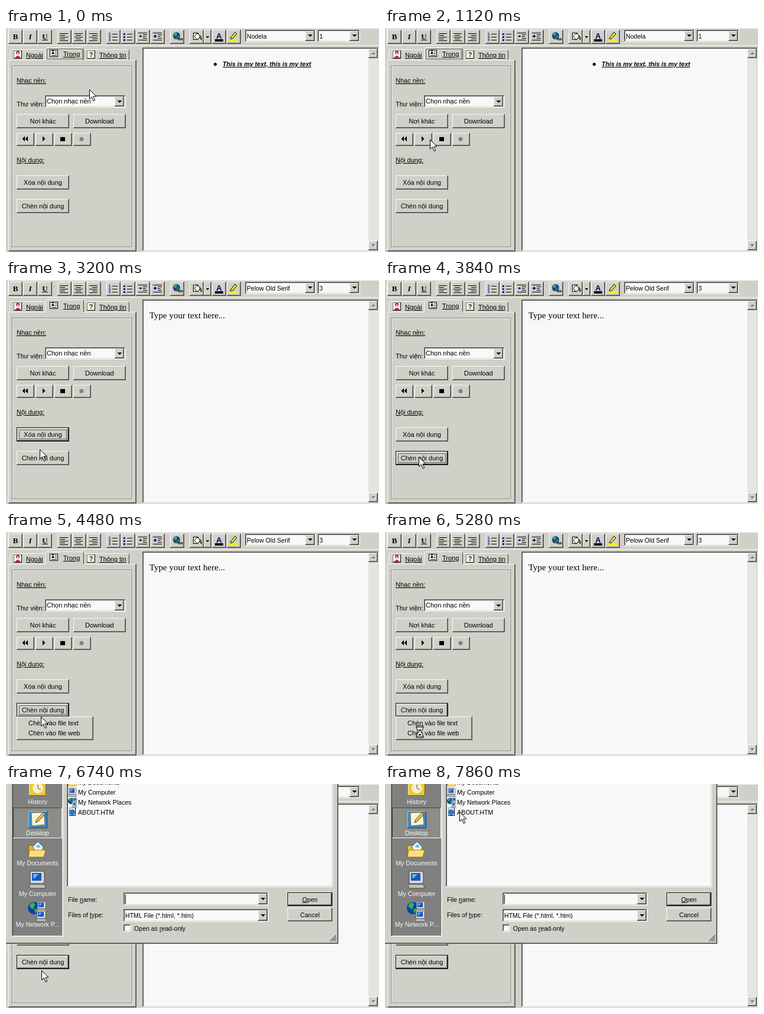
Write an HTML page that moves like this. It is 632 px wide and 380 px high and loops after 8 s.

```html
<!DOCTYPE html>
<html lang="vi">
<head>
<meta charset="utf-8">
<title>Editor panel</title>
<style>
html, body { margin: 0; width: 100%; height: 100%; overflow: hidden; background: #d0d0c8; }
svg { display: block; width: 632px; height: 380px; }
text { font: 11px "Liberation Sans", Arial, sans-serif; white-space: pre; }
.narrow { font-size: 10.6px; }
.u { text-decoration: underline; }
.bold { font-weight: bold; }
.italic { font-style: italic; }
.serif { font-family: "Liberation Serif", Times, serif; }
.size13 { font-size: 13px; }
.size15 { font-size: 15px; }
.tiny { font-size: 6px; }
path, rect { shape-rendering: crispEdges; }
.smooth, .smooth path { shape-rendering: auto; }
</style>
</head>
<body>
<svg id="stage" viewBox="0 0 632 380" xmlns="http://www.w3.org/2000/svg"></svg>
<script>
const FACE = '#d0d0c8', WHITE = '#f8f8f8', GREY = '#808080', DARK = '#404040', BLACK = '#000', BLUE = '#000090';
const LOOP = 8000, STEP = 160;

const rect = (x, y, w, h, fill) => `<rect x="${x}" y="${y}" width="${w}" height="${h}" fill="${fill}"/>`;
const shape = (d, fill, stroke = 'none', extra = '') => `<path d="${d}" fill="${fill}" stroke="${stroke}" ${extra}/>`;
const smooth = (d, fill, stroke = 'none', extra = '') => shape(d, fill, stroke, 'class="smooth" ' + extra);
const disc = (x, y, r, fill) => `<circle cx="${x}" cy="${y}" r="${r}" fill="${fill}"/>`;
const text = (x, y, s, style = '', attrs = '') => `<text x="${x}" y="${y}" class="${style}" ${attrs}>${s}</text>`;
const centered = (x, y, s, style = '', fill = BLACK) => text(x, y, s, style, `text-anchor="middle" fill="${fill}"`);
const group = (id, ...parts) => `<g id="${id}">${parts.join('')}</g>`;
const at = (x, y, ...parts) => `<g transform="translate(${x} ${y})">${parts.join('')}</g>`;

function frame(x, y, w, h, topLeft, bottomRight) {
  const l = x + .5, t = y + .5, r = x + w - .5, b = y + h - .5, cap = 'stroke-linecap="square"';
  return shape(`M${l} ${b}V${t}H${r}`, 'none', topLeft, cap) +
         shape(`M${r} ${t}V${b}H${l}`, 'none', bottomRight, cap);
}
const raised = (x, y, w, h) => rect(x, y, w, h, FACE) +
  frame(x, y, w, h, WHITE, DARK) + frame(x + 1, y + 1, w - 2, h - 2, FACE, GREY);
const sunken = (x, y, w, h, fill = WHITE) => rect(x, y, w, h, fill) +
  frame(x, y, w, h, GREY, WHITE) + frame(x + 1, y + 1, w - 2, h - 2, DARK, FACE);
const etched = (x, y, w, h) => frame(x + 1, y + 1, w, h, WHITE, WHITE) + frame(x, y, w, h, GREY, GREY);
const dotted = (x, y, w, h) =>
  shape(`M${x + .5} ${y + .5}h${w - 1}v${h - 1}h${1 - w}z`, 'none', BLACK, 'stroke-dasharray="1 1"');

const downArrow = (x, y, c = BLACK) => shape(`M${x - 4} ${y - 2}h8l-4 4z`, c);

function button(x, y, w, h, label, isDefault = false, style = '') {
  const box = isDefault ? rect(x, y, w, h, BLACK) + raised(x + 1, y + 1, w - 2, h - 2) : raised(x, y, w, h);
  return box + centered(x + w / 2, y + h / 2 + 4, label, style);
}
function combo(x, y, w, h, label, base = y + h - 6) {
  const ax = x + w - 18;
  return sunken(x, y, w, h) + text(x + 3, base, label, 'narrow') +
    raised(ax, y + 2, 16, h - 4) + downArrow(ax + 8, Math.floor(y + h / 2));
}

// Lines of a paragraph or list glyph; each line is [offset, length].
const bars = (lines, color = BLACK) =>
  lines.map(([dx, len], i) => rect(dx, i * 3, len, 1, color)).join('');
const aligned = pull => bars([14, 9, 14, 9, 14].map(n => [Math.floor((14 - n) * pull), n]));

function globe(x, y, r) {
  return disc(x, y, r, '#1040a8') +
    smooth(`M${x - r * .8} ${y - r * .3}q${r * .5} ${-r} ${r} ${-r * .3}l${-r * .4} ${r * .8}z` +
      `M${x} ${y + r * .2}l${r * .8} ${-r * .3}l${-r * .5} ${r * .9}z`, '#30b848');
}

function toolbar() {
  const buttonXs = [4, 29, 54, 87, 112, 137, 170, 195, 220, 245, 278, 311, 349, 374];
  const glyph = (x, s, style) => centered(x, 19, s, 'serif bold size13 ' + style);
  const threeRows = row => [0, 1, 2].map(row).join('');
  const numbers = threeRows(i => text(0, i * 5 + 2, i + 1, 'tiny bold', `fill="${BLUE}"`));
  const bullets = threeRows(i => rect(0, i * 5 - 1, 3, 3, BLUE));
  const listLines = threeRows(i => rect(6, i * 5, 9, 1, BLACK));
  const indent = arrow => bars([[0, 15], [8, 7], [8, 5], [8, 7], [0, 15]]) + shape(arrow, BLUE);
  return rect(3, 0, 629, 1, WHITE) + rect(3, 0, 1, 29, WHITE) + rect(3, 29, 629, 1, WHITE) +
    buttonXs.map(x => raised(x, 3, 24, 24)).join('') +
    glyph(16, 'B', '') + glyph(41, 'I', 'italic') + glyph(66, 'U', '') + rect(61, 20, 10, 1, BLACK) +
    at(91, 9, aligned(0)) + at(116, 9, aligned(.5)) + at(141, 9, aligned(1)) +
    at(174, 10, numbers, listLines) + at(199, 10, bullets, listLines) +
    at(224, 8, indent('M1 6l3-3v2h2v2h-2v2z')) + at(249, 8, indent('M6 6l-3-3v2h-2v2h2v2z')) +
    globe(289, 13, 6) + smooth('M286 17h6m1 2h5', 'none', BLACK, 'stroke-width="3" stroke-linecap="round"') +
    smooth('M286 17h6m1 2h5', 'none', FACE, 'stroke-linecap="round"') +
    rect(317, 8, 9, 12, WHITE) + frame(317, 8, 9, 12, BLACK, BLACK) +
    smooth('M319 14l5-5 6 5-6 6z', WHITE, BLACK) + smooth('M328 13q4 1 3 7q-3-2-3-7', '#c8b000', BLACK) +
    raised(335, 3, 13, 24) + shape('M338 14h6l-3 3z', BLACK) +
    centered(361, 18, 'A', 'bold size13', '#000060') + rect(354, 19, 14, 4, BLACK) +
    smooth('M381 16l7-9 3 3-7 8-4 1z', '#f8e820', BLACK) + rect(379, 19, 14, 4, '#f8f000');
}

function tab(x, y, w, label, labelX) {
  const h = 55 - y;
  return rect(x, y, w, h, FACE) + shape(`M${x + .5} 55V${y + 2.5}l2-2H${x + w - 2}`, 'none', WHITE) +
    shape(`M${x + w - .5} ${y + 2}V54`, 'none', DARK) + text(labelX, y < 35 ? 48 : 50, label, 'u');
}

function sidePanel() {
  const media = 'M27 188l5-4v8zM32 188l5-4v8zM62 184l4 4-4 4zM92 185h8v7h-8z';
  return tab(6, 36, 61, 'Ngoài', 34) + tab(131, 36, 78, 'Thông tin', 158) +
    raised(4, 54, 217, 325) + tab(66, 33, 66, 'Trong', 97) + rect(67, 54, 63, 2, FACE) +
    rect(13, 38, 14, 14, WHITE) + frame(13, 38, 14, 14, GREY, BLACK) +
    disc(20, 42, 3, '#a01028') + disc(20, 43, 2, '#f0b890') + smooth('M15 51q5-8 10 0z', '#e02048') +
    rect(74, 37, 14, 12, WHITE) + frame(74, 37, 14, 12, BLACK, BLACK) +
    smooth('M77 44l2.5-5 2.5 5zM78 37h3v2h-3z', BLACK) +
    at(77, 40, bars([[6, 3], [6, 3], [0, 9]])) +
    rect(137, 38, 14, 14, '#f8f8c0') + frame(137, 38, 14, 14, GREY, BLACK) +
    centered(144, 49, '?', 'bold', '#1010b0') +
    etched(10, 64, 204, 308) +
    text(18, 93, 'Nhac nền:', 'u') + text(18, 133, 'Thư viện:') +
    sunken(66, 114, 137, 21) + text(69, 128, 'Chọn nhạc nền') + raised(184, 116, 16, 17) + downArrow(192, 125) +
    button(18, 146, 89, 24, 'Nơi khác') + button(114, 146, 89, 24, 'Download') +
    [18, 50, 82, 114].map(x => raised(x, 178, 30, 22)).join('') +
    shape(media, BLACK) + disc(128, 188.5, 3.5, GREY) +
    text(18, 228, 'Nội dung:', 'u') +
    button(18, 250, 89, 24, 'Xóa nội dung') + button(18, 290, 89, 24, 'Chèn nội dung');
}

function editor() {
  const scroll = (y, arrow) => raised(614, y, 16, 16) + at(1, 1, shape(arrow, WHITE)) + shape(arrow, GREY);
  return sunken(231, 33, 401, 346) + rect(614, 35, 16, 342, '#e4e4e0') +
    scroll(35, 'M618 45h8l-4-4z') + scroll(361, 'M618 367h8l-4 4z');
}

function menu() {
  const item = (y, s) => text(38, y, s);
  const hot = (id, y, s) => group(id, rect(21, y - 12, 124, 17, '#082068'),
    text(38, y, s, '', `fill="${WHITE}"`));
  const first = 'Chèn vào file text', second = 'Chèn vào file web';
  return raised(18, 313, 130, 40) + item(328, first) + item(345, second) +
    hot('hotFirst', 328, first) + hot('hotSecond', 345, second);
}

const scaled = (x, y, k, ...parts) => `<g transform="translate(${x} ${y}) scale(${k})">${parts.join('')}</g>`;
const monitor = (x, y, k) => scaled(x, y, k,
  smooth('M3 1h21l3 2v17l-3 2h-21z', '#d8d8d0', DARK), rect(6, 4, 16, 13, '#1858c8'),
  smooth('M8 6h9l-8 8z', '#68c0f0'), smooth('M2 23h24l4 5-4 2h-22l-3-3z', '#c0c0b8', DARK));
const folder = (x, y, k) => scaled(x, y, k,
  smooth('M1 7h10l3 3h13v17h-26z', '#e8b830', '#785808'),
  smooth('M9 9l8-8 9 9-4 9h-10z', WHITE, '#3080b0'), smooth('M13 10l5-5 4 6z', '#60b0e0'),
  smooth('M1 27l2-12h27l-3 12z', '#f8e080', '#a07810'));
const network = (x, y, k) => globe(x + 10 * k, y + 11 * k, 10 * k) +
  monitor(x + 14 * k, y, k * .55) + monitor(x + 13 * k, y + 15 * k, k * .58);

const PLACES = [['My Documents', 93], ['My Computer', 145], ['My Network P...', 197]];

function dialog() {
  const label = (y, s) => centered(53.5, y, s, 'narrow', WHITE);
  return rect(0, 0, 563, 271, FACE) + rect(561, 0, 1, 270, GREY) + rect(562, 0, 1, 271, DARK) +
    rect(0, 269, 562, 1, GREY) + rect(0, 270, 563, 1, DARK) +
    sunken(10, -10, 87, 269, GREY) +
    rect(12, 40, 83, 52, '#8c8c88') + frame(12, 40, 83, 52, DARK, WHITE) +
    rect(39, -6, 29, 26, '#e8c840') + frame(39, -6, 29, 26, '#f8f0a0', '#806000') +
    disc(54, 7, 9, '#f8f0c8') + smooth('M54 1v6l5 3', 'none', DARK) + label(34, 'History') +
    rect(38, 46, 32, 29, '#3888c8') + frame(38, 46, 32, 29, '#90c8f0', '#103878') +
    smooth('M43 49l21-1 2 21-22 2z', '#f8f4d8', '#907848') +
    smooth('M50 66l2-6 11-12 3 3-11 12z', '#f0c030', DARK) + label(87, 'Desktop') +
    folder(37, 97, 1) + monitor(38, 147, 1) + network(37, 199, 1.05) +
    PLACES.map(([s, y], i) => group('hot' + i, frame(12, y, 83, 51, WHITE, DARK)) + label(y + 45, s)).join('') +
    sunken(103, -10, 451, 185);
}

// Parts of the dialog that are still blank while it is being painted.
function unpainted() {
  const blank = (x, y, w, h) => rect(x, y, w, h, WHITE);
  const seams = (y, h) => [213, 220, 231].map(x =>
    rect(x, y, 1, h, GREY) + rect(x + 1, y, 1, h, x > 230 ? DARK : WHITE)).join('');
  return blank(199, 184, 246, 22) + blank(478, 184, 75, 24) + blank(232, 212, 213, 21) +
    blank(478, 210, 75, 23) + blank(232, 238, 207, 13) + blank(543, 251, 16, 16) +
    seams(212, 21) + seams(238, 13) +
    frame(106, 188, 6, 12, FACE, DARK) + frame(113, 188, 31, 12, FACE, DARK) + downArrow(128, 191, GREY);
}

function fields() {
  const u = c => `<tspan class="u">${c}</tspan>`;
  const grip = [0, 4, 8].map(i => shape(`M${549 + i} 267L559 ${257 + i}`, 'none', GREY, 'stroke-width="1.5"')).join('');
  return text(105, 200, `File ${u('n')}ame:`, 'narrow') + text(105, 226, `Files of ${u('t')}ype:`, 'narrow') +
    combo(199, 184, 246, 22, '') + rect(202, 188, 1, 15, BLACK) +
    combo(199, 212, 246, 22, 'HTML File (*.html, *.htm)', 227) +
    sunken(199, 238, 13, 13) + text(217, 249, `Open as ${u('r')}ead-only`, 'narrow') +
    button(477, 184, 76, 23, u('O') + 'pen', true, 'narrow') + button(477, 210, 76, 23, 'Cancel', false, 'narrow') + grip;
}

function fileList() {
  const row = (y, s) => text(122, y, s, 'narrow');
  return folder(105, -11, .52) + monitor(105, 6, .52) + network(105, 23, .52) +
    rect(107, 40, 11, 14, WHITE) + frame(107, 40, 11, 14, GREY, BLACK) + disc(112, 48, 5, '#2878d0') +
    row(1, 'My Documents') + row(18, 'My Computer') + row(35, 'My Network Places') + row(52, 'ABOUT.HTM');
}

const arrow = smooth('M.5.5v16l3.7-3.6 3 7 2.6-1.2-3-6.6h5.2z', WHITE, BLACK);
const hourglass = smooth('M53 329h12v3h-1v3l-3.5 4 3.5 4v3h1v3h-12v-3h1v-3l3.5-4-3.5-4v-3h-1z', WHITE, BLACK) +
  smooth('M53 331h12M53 347h12', 'none', BLACK) + smooth('M56 335h6l-3 3zM56 345l3-3 3 3z', BLACK);
const fontCombos = (font, size) => combo(405, 3, 120, 21, font) + combo(528, 3, 72, 21, size);

const stage = document.getElementById('stage');
stage.innerHTML = rect(0, 0, 632, 380, FACE) + toolbar() + sidePanel() + editor() +
  group('oldFont', fontCombos('Nodela', '1')) +
  group('newFont', fontCombos('Pelow Old Serif', '3')) +
  group('oldText', disc(354.5, 61.5, 2.6, BLACK),
    text(367, 65, 'This is my text, this is my text', 'narrow u bold italic')) +
  group('newText', text(243, 65, 'Type your text here...', 'serif size15')) +
  group('tabFocus', dotted(69, 35, 61, 18)) +
  group('clearFocus', button(18, 250, 89, 24, 'Xóa nội dung', true), dotted(22, 254, 81, 16)) +
  group('insertDefault', button(18, 290, 89, 24, 'Chèn nội dung', true)) +
  group('insertDots', dotted(22, 294, 81, 16)) +
  group('menu', menu()) +
  group('dialog', dialog(), group('unpainted', unpainted()), group('fields', fields()), group('fileList', fileList())) +
  group('hourglass', hourglass) + group('arrow', arrow);

const parts = Object.fromEntries([...stage.querySelectorAll('g[id]')].map(g => [g.id, g]));
const show = (id, on) => parts[id].setAttribute('display', on ? 'inline' : 'none');

// Cursor legs: time of the first step, number of steps, end point.
const LEGS = [[480, 7, 60, 210], [1600, 4, 57, 257], [2880, 3, 57, 287], [3360, 2, 57, 300],
  [4320, 2, 59, 313], [4640, 3, 58, 339], [6410, 1, 60, 332], [6740, 7, 66, 47], [7860, 1, 126, 47]];

function cursorAt(t) {
  let x = 141, y = 104;
  for (const [start, steps, toX, toY] of LEGS) {
    if (t < start) break;
    const k = Math.min(1, (Math.floor((t - start) / STEP) + 1) / steps);
    const eased = steps > 3 ? k * k * (3 - 2 * k) : k;
    x += (toX - x) * eased;
    y += (toY - y) * eased;
  }
  return [Math.round(x), Math.round(y)];
}

function render(t) {
  const within = (a, b = LOOP) => t >= a && t < b;
  const [x, y] = cursorAt(t);
  show('oldText', within(0, 2400));
  show('newText', within(2400));
  show('oldFont', within(0, 2560));
  show('newFont', within(2560));
  show('tabFocus', within(0, 2240));
  show('clearFocus', within(2240, 3840));
  show('insertDefault', within(3840));
  show('insertDots', within(3840, 5120));
  show('menu', within(4000, 6250));
  show('hotFirst', within(4640, 4800));
  show('hotSecond', within(4800, 5280));
  show('dialog', within(5760));
  show('unpainted', within(5760, 6090));
  show('fields', within(6090));
  show('fileList', within(6250));
  show('hourglass', within(5280, 5760));
  show('arrow', !within(5280, 5760));
  PLACES.forEach(([, top], i) => show('hot' + i, within(6740) && y >= top && y < top + 52));
  parts.arrow.setAttribute('transform', `translate(${x} ${y})`);
}

const began = performance.now();
function tick() {
  render((performance.now() - began) % LOOP);
  requestAnimationFrame(tick);
}
tick();
</script>
</body>
</html>
```
